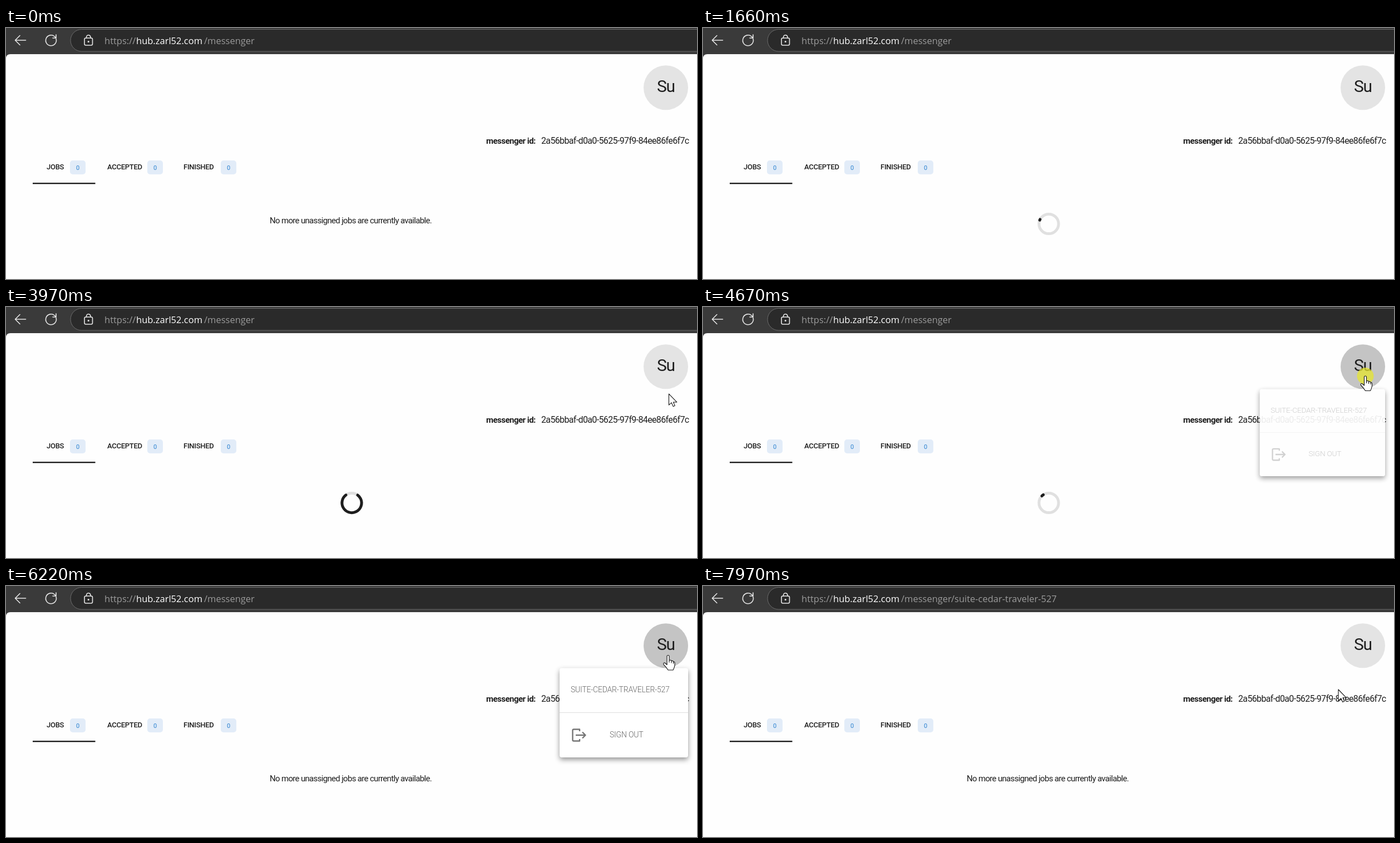
These frames come from a looping animation (1242 px wide and 451 px high, 8040 ms). An HTML page:

```html
<!DOCTYPE html>
<html lang="en">
<head>
<meta charset="utf-8">
<title>Messenger</title>
<style>
  html, body { margin: 0; height: 100%; overflow: hidden; background: #fefefe; }
  svg { display: block; width: 1242px; height: 451px; }
  text { font-family: Roboto, sans-serif; font-size: 15px; letter-spacing: -.045em; fill: #1e1e1e; }
  .url text { font: 16.5px "Open Sans", sans-serif; letter-spacing: 0; fill: #9b9b9b; }
  .url .host { fill: #fff; }
  .line { fill: none; stroke: #e6e6e6; stroke-width: 1.6; stroke-linecap: round; stroke-linejoin: round; }
  .tab { font-size: 13px; font-weight: 500; letter-spacing: -.02em; }
  .count { font-size: 11px; fill: #2a80d0; text-anchor: middle; letter-spacing: 0; }
  .label { font-weight: 700; letter-spacing: -.035em; }
  .id { font-size: 16px; letter-spacing: -.04em; }
  .initials { font-size: 30px; }
  .item { font-size: 14px; font-weight: 300; letter-spacing: -.015em; fill: #666; }
  .icon { fill: none; stroke: #757575; stroke-width: 2.4; stroke-linejoin: round; }
  .panel { filter: drop-shadow(0 4px 5px rgba(0, 0, 0, .42)); }
  .cursor path { fill: #fff; stroke: #111; stroke-width: 1.1; stroke-linejoin: round; }
</style>
</head>
<body>
<svg viewBox="0 0 1242 451">
  <rect width="1242" height="60" fill="#3a3a3a"/>
  <path d="M0 451V55Q0 47 8 47H1242V451Z" fill="#fefefe"/>
  <rect x="116" y="2.5" width="1160" height="39.5" rx="19.75" fill="#2a2a2a" stroke="#6c6c6c"/>
  <g class="line">
    <path d="M35.5 22H16.5M25 13.5L16.5 22L25 30.5"/>
    <path d="M90 19.5A9.5 9.5 0 1 1 87 15L89.5 17.5M90 12V18H84"/>
    <rect x="141" y="18" width="14.5" height="13" rx="2.5"/>
    <path d="M144.5 18V16.5a3.75 3.75 0 0 1 7.5 0V18"/>
    <circle cx="148.2" cy="24.5" r=".8"/>
  </g>
  <g class="url">
    <text x="177" y="29">https://</text>
    <text x="234" y="29" class="host">hub.zarl52.com</text>
    <text x="356" y="29">/messenger</text>
    <text x="446" y="29" id="slug">/suite-cedar-traveler-527</text>
  </g>

  <circle cx="1186" cy="107.3" r="40" fill="#e4e4e4"/>
  <circle cx="1186" cy="107.3" r="40" id="shade"/>
  <text x="1170" y="115" class="initials">Su</text>
  <text x="863" y="208" class="label">messenger id:</text>
  <text x="962" y="208" class="id">2a56bbaf-d0a0-5625-97f9-84ee86fe6f7c</text>

  <g id="tabs"></g>
  <rect x="48" y="278" width="112.5" height="2.4" fill="#1e1e1e"/>

  <text x="474" y="351" id="message">No more unassigned jobs are currently available.</text>
  <g id="spinner" fill="none" stroke-width="5">
    <circle cx="621.5" cy="352" r="17.6" stroke="#e0e0e0"/>
    <circle cx="621.5" cy="352" r="17.6" stroke="#1e1e1e" stroke-linecap="round" pathLength="125.66" id="arc"/>
  </g>

  <g id="menu">
    <rect x="995" y="147.5" width="231" height="160.5" rx="4" fill="#fff" class="panel" id="panel"/>
    <g id="items">
      <text x="1015" y="191" class="item">SUITE-CEDAR-TRAVELER-527</text>
      <path d="M995 227.5H1226" stroke="#dedede"/>
      <path class="icon" d="M1031 261V257.5H1020.5Q1018.5 257.5 1018.5 259.5V276.5Q1018.5 278.5 1020.5 278.5H1031V275M1024 268H1041M1036 262.5L1041.5 268L1036 273.5"/>
      <text x="1085" y="271.5" class="item">SIGN OUT</text>
    </g>
  </g>

  <g id="cursor" class="cursor">
    <circle r="15" fill="#e6e62d" opacity=".75" id="click"/>
    <path id="arrow" d="M0 0V20L4.7 15.8L7.7 22.5L10.8 21L8 14.8H14.3Z"/>
    <path id="hand" d="M-2 2a2 2 0 0 1 4 0V9q3.5-1 4 1q3-.5 3.5 1.2q2.5 0 2.5 2.8V18Q11 23 9 26.5H0Q-3.500 21-8 16.500Q-9 13-6 13.500L-2 17ZM2 9V13M6 10V14M9.500 11.500V15"/>
  </g>
</svg>
<script>
const LOOP = 8040, SPIN = 1483, SPIN_START = 1615, ARC_PATH = 125.66;
const $ = id => document.getElementById(id);
const show = (id, on) => $(id).setAttribute('visibility', on ? 'visible' : 'hidden');
const set = (id, name, value) => $(id).setAttribute(name, value);
const ramp = (t, from, to) => Math.min(1, Math.max(0, (t - from) / (to - from)));
const mix = (a, b, k) => a + (b - a) * k;
const easeOut = k => 1 - (1 - k) ** 2;
const smooth = k => k * k * (3 - 2 * k);

// cubic-bezier(.42, 0, .58, 1)
function easeInOut(x) {
  let lo = 0, hi = 1;
  for (let i = 0; i < 20; i++) {
    const u = (lo + hi) / 2;
    if (1.26 * u * (1 - u) ** 2 + 1.74 * u * u * (1 - u) + u ** 3 < x) lo = u; else hi = u;
  }
  return smooth(lo);
}

$('tabs').innerHTML = [['JOBS', 73, 115], ['ACCEPTED', 182, 254], ['FINISHED', 319, 386]]
  .map(([name, x, badge]) => `<text class="tab" x="${x}" y="253.500">${name}</text>
    <rect x="${badge}" y="238" width="28" height="25" rx="5" fill="#e2ecf8"/>
    <text class="count" x="${badge + 14}" y="254.500">0</text>`).join('');

function drawSpinner(t) {
  const p = (t - SPIN_START) / SPIN % 1;
  const grow = easeInOut(Math.min(1, p * 2));
  const shift = easeInOut(Math.max(0, p * 2 - 1));
  const start = 15 * grow + 109 * shift;
  const length = Math.min(1 + 99 * grow, ARC_PATH - start);
  set('arc', 'stroke-dasharray', `${length} 200`);
  set('arc', 'stroke-dashoffset', -start);
  set('arc', 'transform', `rotate(${180 + 720 * p} 621.5 352)`);
}

function cursorAt(t) {
  if (t < 4110) {
    const k = easeOut(ramp(t, 3600, 3980));
    return [mix(1080, 1191.5, k), mix(400, 156, k) - 10 * ramp(t, 3980, 4110)];
  }
  if (t < 6180) {
    const k = smooth(ramp(t, 4110, 4500));
    return [mix(1191.5, 1190.5, k), mix(146, 124, k) + 2 * ramp(t, 4740, 4900)];
  }
  const u = smooth(ramp(t, 6180, 6760)), v = 1 - u;
  return [1190.5 * v * v + 2 * 1175 * u * v + 1142 * u * u, 126 * v * v + 2 * 73 * u * v + 186 * u * u];
}

function draw(t) {
  const loading = t >= 1660 && t < 4870;
  show('message', !loading);
  show('spinner', loading);
  if (loading) drawSpinner(t);
  show('slug', t >= 7970);

  const closing = ramp(t, 7400, 7640);
  const open = easeOut(ramp(t, 4560, 4780)) * (1 - closing);
  const scale = .9 + .1 * open;
  show('menu', open > 0);
  set('menu', 'transform', `translate(1226 147.5) scale(${scale}) translate(-1226 -147.5)`);
  set('panel', 'opacity', open ** .3);
  set('items', 'opacity', open ** 4);
  set('shade', 'opacity', (.03 * ramp(t, 4250, 4400) + .11 * ramp(t, 4530, 4650)) * (1 - closing));

  const [x, y] = cursorAt(t);
  const pointing = t > 4200 && t < 7600;
  const visible = t >= 3600;
  set('cursor', 'transform', `translate(${x} ${y})`);
  show('arrow', visible && !pointing);
  show('hand', visible && pointing);
  show('click', t >= 4530 && t < 4800 || t >= 7440 && t < 7580);
}

const began = performance.now();
(function tick() {
  draw((performance.now() - began) % LOOP);
  requestAnimationFrame(tick);
})();
</script>
</body>
</html>
```
